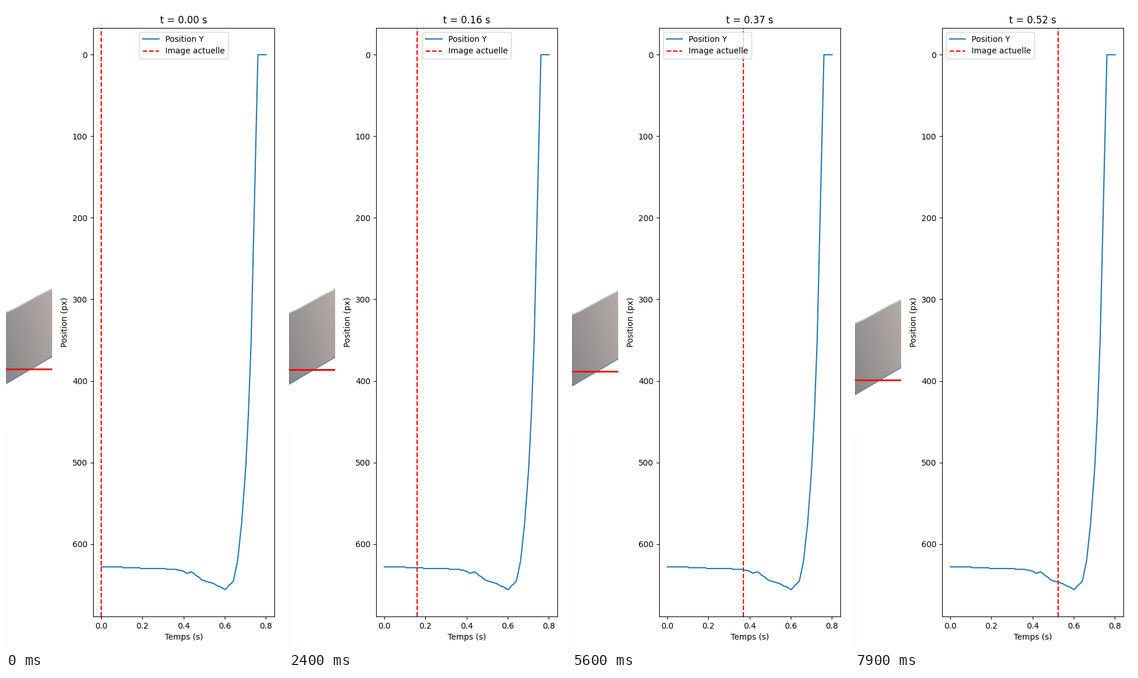
Write a matplotlib script that moves like this. It is 480 px wide and 1114 px high and loops after 8 s.

```python
import numpy as np
import matplotlib.pyplot as plt
from matplotlib.animation import FuncAnimation
from matplotlib.patches import Polygon, Rectangle
from matplotlib.transforms import Affine2D

W, H, DPI = 480, 1114, 100
FRAMES, INTERVAL = 80, 100
SAMPLES = 122
DT = 0.006625
PHOTO_W = 80
PT = 72 / DPI          # one pixel in points

# Tracked height in whole pixels: slow sag, dip, then a fast rise out of view
KEYS = [(0, 628), (22, 628.7), (34, 630.2), (47, 630.4), (56, 631.6),
        (60, 633), (63, 636), (66, 634), (75, 645), (82, 648), (91, 656),
        (97, 645), (100, 621), (103, 575), (106, 507), (108, 440),
        (110, 352), (115, 0)]
steps = np.arange(SAMPLES)
time = steps * DT
height = np.round(np.interp(steps, *zip(*KEYS)))

fig = plt.figure(figsize=(W / DPI, H / DPI), dpi=DPI, facecolor="white")


def add_axes(left, top, right, bottom):
    """Axes placed by pixel edges measured from the top left."""
    return fig.add_axes([left / W, 1 - bottom / H,
                         (right - left) / W, (bottom - top) / H])


def band_gradient(n=32):
    """Soft grey shading, darker towards the lower left."""
    u = np.linspace(0, 1, n)[None, :, None]
    v = np.linspace(0, 1, n)[:, None, None]
    dark = np.array([136, 134, 135])
    right = np.array([28, 23, 20])
    up = np.array([16, 15, 14])
    return (dark + right * u + up * (1 - v)) / 255


# Left: strip of footage with the moving band
photo = add_axes(0, 0, PHOTO_W, H)
shift = Affine2D()
moving = shift + photo.transData
top_edge = np.array([(0, 530), (14, 524), (57, 500.5), (80, 489)])
low_edge = np.array([(0, 653.5), (80, 606.5)])

outline = Polygon(np.vstack([top_edge, low_edge[::-1]]), fc="none",
                  ec="none", transform=moving)
photo.add_patch(outline)
shade = photo.imshow(band_gradient(), extent=(0, PHOTO_W, 655, 487),
                     aspect="auto", interpolation="bilinear",
                     transform=moving)
shade.set_clip_path(outline)
photo.plot(*top_edge.T, color="#c3cdd0", lw=2 * PT, transform=moving)
photo.plot(*low_edge.T, color="#5f8298", lw=1.6 * PT, transform=moving)
photo.add_patch(Rectangle((0, 738), 1, H - 738, fc="#e0ffff", ec="none"))
level = Rectangle((0, 0), PHOTO_W, 3, fc="red", ec="none", zorder=5)
photo.add_patch(level)
photo.set(xlim=(0, PHOTO_W), ylim=(H, 0))
photo.axis("off")

# Right: height against time
chart = add_axes(151, 38, 465, 1056)
chart.plot(time, height, color="#1f77b4", label="Position Y")
cursor = chart.axvline(0, color="red", ls="--", label="Image actuelle")
x_pad, y_pad = 0.05 * time[-1], 0.05 * height.max()
chart.set(xlim=(-x_pad, time[-1] + x_pad),
          ylim=(height.max() + y_pad, -y_pad),
          xticks=np.arange(5) * 0.2, yticks=np.arange(7) * 100,
          xlabel="Temps (s)", ylabel="Position (px)")
chart.legend(loc="best")
title = chart.set_title("")


def update(i):
    y = height[i]
    shift.clear().translate(0, y - height[0])
    level.set_y(y - 1)
    cursor.set_xdata([time[i], time[i]])
    title.set_text(f"t = {time[i]:.2f} s")
    return shade, level, cursor, title


anim = FuncAnimation(fig, update, frames=FRAMES, interval=INTERVAL,
                     repeat=True, repeat_delay=0)
plt.show()
```
